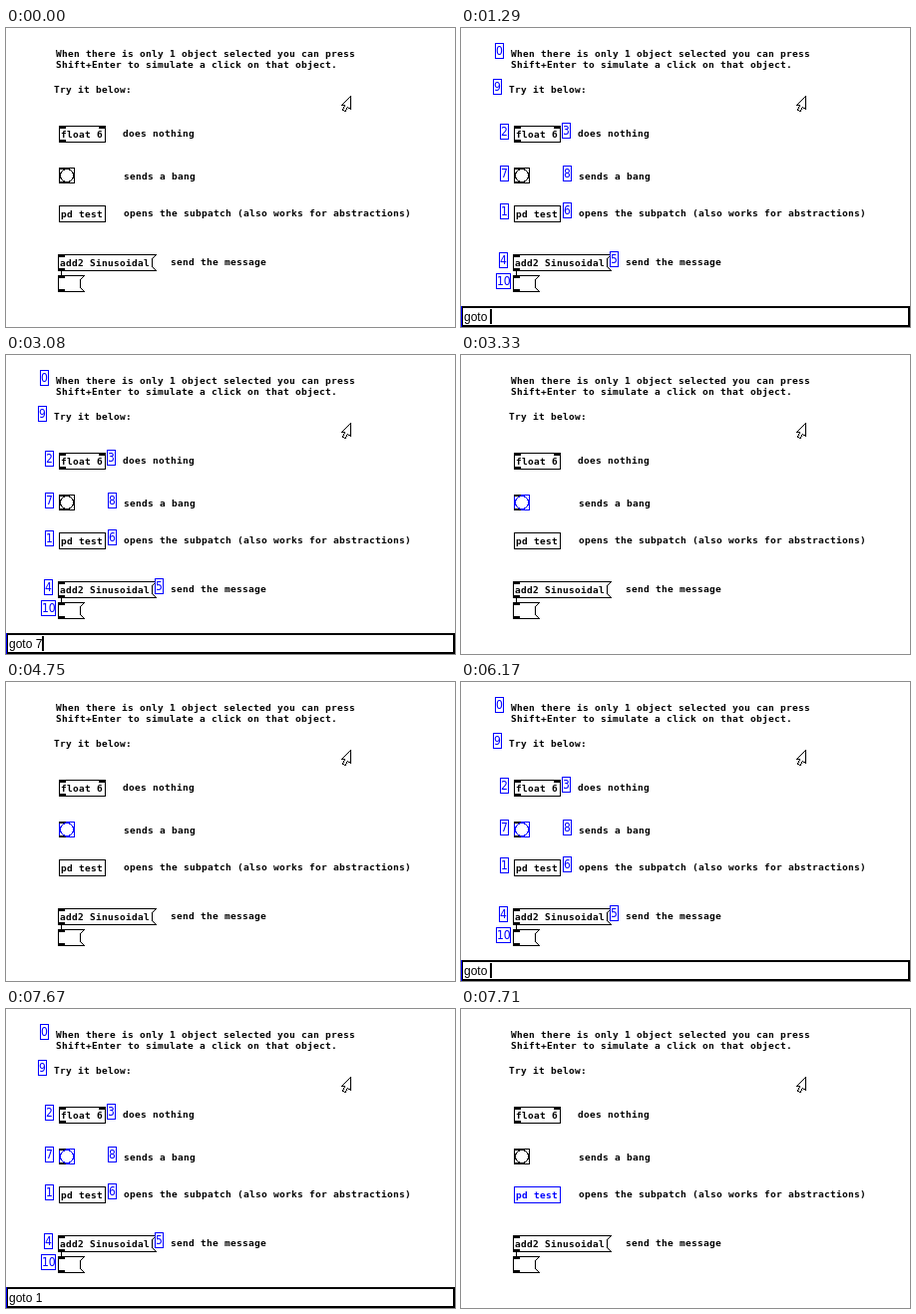
Animation, 450 px wide and 300 px high, one loop 8000 ms. Source, as an HTML page:

```html
<!DOCTYPE html>
<html lang="en">
<head>
<meta charset="utf-8">
<title>Go to object by number</title>
<style>
  html, body { margin: 0; width: 100%; height: 100%; overflow: hidden; background: #fff; }
  svg { display: block; width: 450px; height: 300px; }
  text { white-space: pre; fill: #000; }
  .patch { font: bold 9.5px "DejaVu Sans Mono", monospace; letter-spacing: 0.28px; }
  .label { font: 12px "DejaVu Sans Condensed", "Noto Sans", sans-serif; fill: #00f; }
  .entry { font: 12px "Liberation Sans", Arial, sans-serif; }
  .line { fill: #fff; stroke: #000; stroke-width: 1; }
  .tag { fill: #fff; stroke: #00f; }
  .selected .line { stroke: #00f; }
  .selected text { fill: #00f; }
  rect, .line { shape-rendering: crispEdges; }
</style>
</head>
<body>
<svg id="stage" viewBox="0 0 450 300" xmlns="http://www.w3.org/2000/svg"></svg>
<script>
const LOOP = 8000;
const stage = document.getElementById("stage");

function add(parent, tag, attrs, content) {
  const el = document.createElementNS("http://www.w3.org/2000/svg", tag);
  for (const key in attrs) el.setAttribute(key, attrs[key]);
  if (content !== undefined) el.textContent = content;
  parent.appendChild(el);
  return el;
}
const group = () => add(stage, "g", {});
const write = (g, x, y, s, cls = "patch") => add(g, "text", { x, y, class: cls }, s);
const box = (g, x, y, width, height, cls = "line") =>
  add(g, "rect", { x: x + 0.5, y: y + 0.5, width: width - 1, height: height - 1, class: cls });
const fill = (g, x, y, width, height, color = "#000") =>
  add(g, "rect", { x, y, width, height, fill: color });
const iolet = (g, x, y, height = 3) => fill(g, x, y, 7, height);

function message(x, y, w, h, s) {
  const g = group(), r = x + w - 0.5, t = y + 0.5, b = y + h - 0.5;
  add(g, "path", {
    class: "line",
    d: `M${x + 0.5} ${t}H${r}L${r - 4} ${t + 4}V${b - 4}L${r} ${b}H${x + 0.5}Z`
  });
  iolet(g, x, y);
  iolet(g, x, y + h - 3);
  write(g, x + 2, y + 12, s);
}

// Comments
const notes = group();
[
  [50, 29, "When there is only 1 object selected you can press"],
  [50, 40, "Shift+Enter to simulate a click on that object."],
  [48, 65, "Try it below:"],
  [117, 109, "does nothing"],
  [118, 152, "sends a bang"],
  [118, 189, "opens the subpatch (also works for abstractions)"],
  [165, 238, "send the message"]
].forEach(n => write(notes, ...n));

// Objects
const float = group();
box(float, 53, 98, 47, 17);
iolet(float, 53, 98);
iolet(float, 93, 98);
iolet(float, 53, 112);
write(float, 55, 110, "float 6");

const bang = group();
box(bang, 53, 140, 16, 16);
iolet(bang, 53, 140, 2);
iolet(bang, 53, 154, 2);
const button = add(bang, "circle", { cx: 61, cy: 148, r: 6.5, class: "line" });

const subpatch = group();
box(subpatch, 53, 178, 47, 17);
write(subpatch, 55, 190, "pd test");

fill(stage, 55, 243, 1, 6);
message(52, 227, 99, 17, "add2 Sinusoidal");
message(52, 248, 27, 17, "");

// Mouse pointer
add(stage, "path", {
  class: "line",
  d: "M345.5 68.5L336.5 77.5L339.5 78L337.5 82L340 83.5L342.5 79.5L345.5 81.5Z"
});

// Number tags and entry bar
const overlay = group();
[
  [0, 34, 15], [9, 32, 51], [2, 39, 96], [3, 101, 95], [7, 39, 138], [8, 102, 138],
  [1, 39, 176], [6, 102, 175], [4, 38, 225], [5, 149, 224], [10, 35, 246]
].forEach(([n, x, y]) => {
  box(overlay, x, y, n > 9 ? 15 : 9, 16, "tag");
  write(overlay, x + 1, y + 12, n, "label");
});
fill(overlay, 0, 279, 450, 21);
fill(overlay, 0, 279, 1, 21, "#00f");
fill(overlay, 2, 281, 446, 17, "#fff");
const entry = write(overlay, 3, 294, "", "entry");
const caret = fill(overlay, 29, 282, 2, 15);

const within = (t, a, b) => t >= a && t < b;
const show = (el, on) => el.setAttribute("visibility", on ? "inherit" : "hidden");

function draw(t) {
  const first = within(t, 1290, 3330), second = within(t, 6170, 7710);
  const digit = first && t >= 2630 ? "7" : second && t >= 7040 ? "1" : "";
  const caretOff = within(t, 1880, 2210) || within(t, 2790, 3080) ||
    within(t, 6750, 7080) || within(t, 7670, 7710);

  show(overlay, first || second);
  entry.textContent = "goto " + digit;
  caret.setAttribute("x", digit ? 36 : 29);
  show(caret, !caretOff);

  bang.classList.toggle("selected", within(t, 3330, 7710));
  subpatch.classList.toggle("selected", t >= 7710);
  button.style.fill = within(t, 4500, 4750) ? "#000" : "#fff";
}

const start = performance.now();
function tick() {
  draw((performance.now() - start) % LOOP);
  requestAnimationFrame(tick);
}
tick();
</script>
</body>
</html>
```
